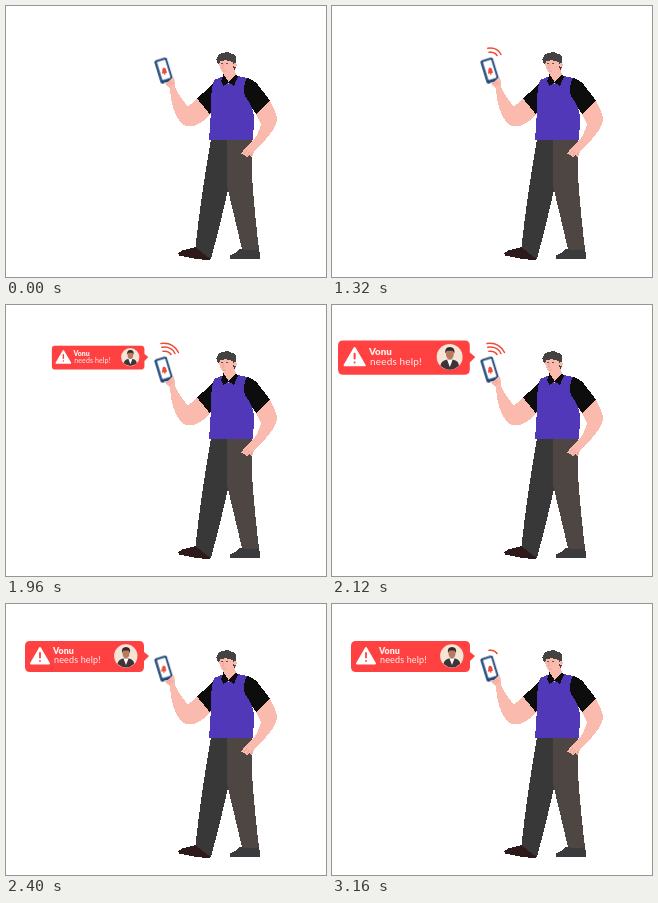
Write an HTML page without scripts that moves like this. It is 320 px wide and 271 px high and loops after 3240 ms.

```html
<!DOCTYPE html>
<html lang="en">
<head>
<meta charset="utf-8">
<title>Help alert</title>
<style>
html, body { margin: 0; width: 100%; height: 100%; overflow: hidden; background: #fff; }
svg { display: block; width: 100%; height: 100%; }
.man { shape-rendering: crispEdges; }
.skin { fill: #fabbae; }
.shirt { fill: #0d0d0d; }
.fold { fill: none; stroke: #e99a8e; stroke-width: .8; stroke-linecap: round; }
.waves { fill: none; stroke: #f04a35; stroke-width: 1.5; stroke-linecap: round; }
.wave, .bubble, .phone, .bell { animation: 3240ms linear infinite; }
.wave { opacity: 0; animation-timing-function: step-end; }
.near { animation-name: near; }
.mid { animation-name: mid; }
.far { animation-name: far; }
.bubble { transform-origin: 140px 52.5px; animation-name: pop; }
.phone { transform-origin: 163px 75px; animation-name: buzz; }
.bell { transform-origin: 158px 61px; animation-name: ring; }
text { font-family: Lato, "Open Sans", sans-serif; fill: #fff0ec; }
.name { font-size: 8.8px; font-weight: 900; }
.note { font-size: 9px; letter-spacing: .15px; }

@keyframes near {
  0%, 72.8% { opacity: 0; }
  37% { opacity: 1; }
  97.5%, 100% { opacity: 1; }
}
@keyframes mid {
  0%, 71.6%, 100% { opacity: 0; }
  39.5% { opacity: 1; }
}
@keyframes far {
  0%, 69.1%, 100% { opacity: 0; }
  43.2% { opacity: 1; }
}
@keyframes pop {
  0%, 52.4% { transform: scale(0); animation-timing-function: ease-in; }
  60.5% { transform: scale(.777); animation-timing-function: ease-out; }
  65.4% { transform: scale(1.107); }
  66.7% { transform: scale(1.115); animation-timing-function: ease-in; }
  69.1% { transform: scale(1.083); animation-timing-function: ease-out; }
  74.1%, 100% { transform: none; }
}
@keyframes buzz {
  0%, 35.8%, 46.9%, 53.1%, 69.2%, 100% { transform: none; }
  38.3%, 43.2%, 55.6%, 63% { transform: rotate(1.2deg); }
  40.7%, 45.7%, 60.5%, 65.4% { transform: none; }
}
@keyframes ring {
  0%, 17.3%, 18.5%, 34.6%, 70.4%, 86.4%, 100% { transform: none; }
  4%, 22%, 74.1% { transform: rotate(7deg); }
  10%, 28%, 80% { transform: rotate(-7deg); }
}
</style>
</head>
<body>
<svg viewBox="0 0 320 271">
  <g class="man">
    <!-- shoes and legs -->
    <path fill="#2e1a1b" d="M172.500 247.500Q175 244 182 243L190 241L205 250L204 254.500Q188 253 173 249.500Z"/>
    <path fill="#3b3b3d" d="M223.500 253V250Q230 247 234 243L252 242Q254.500 246 254.500 253Z"/>
    <path fill="#383838" d="M205 133H222V184Q214 220 205 253Q196 247 189.500 241Q195 190 205 133Z"/>
    <path fill="#4d4642" d="M221 133H246V170Q249 212 253 243Q244 246 236 243L222 184L221 180Z"/>

    <!-- arms -->
    <path class="skin" d="M192 92L182 100.500Q174 92 169 81L168 73Q164 69 160 74L164 83Q165 103 174 116Q179 122 188 120Q197 117 205 107Z"/>
    <path class="skin" d="M263 94Q271 106 271 115Q268 127 248 145L246 152L243 149L241 152L239 149L235 148Q239 141 243 139Q252 131 255 118L249 106Z"/>
    <path class="fold" d="M241 150L243 146M238 148L241 144M245 150L246 147"/>

    <!-- neck, shirt, vest -->
    <path class="skin" d="M218 63H229L230 71L223 79L217 71Z"/>
    <path class="shirt" d="M208 77L191 92.500L204 108.500L210 96ZM237 71Q248 73 252 79L264 94.500L250 108L238 90Z"/>
    <path fill="#5038b9" d="M208 74L217 70.500L222.500 78L231 70L241 72Q235.500 82 239.500 91Q248 101 248 114L247 134H203L205 105Q204 88 208 74Z"/>
    <path class="shirt" d="M217.500 68L215 75L217.500 80L222.500 76.500L228 80L232 70.500L229.500 68.500L222.500 76Z"/>

    <!-- head -->
    <path class="skin" d="M213 54H229Q232 58 229.500 63L227 66Q222 69.500 217 67Q213 64 213 54Z"/>
    <path fill="#454342" d="M211.500 57Q209 53 212 50Q213 47 217 47.500Q221 45 225 47.500Q230 48 230 53Q231 60 228.500 64L227 61L226.500 56Q220 53 214 55.500L213 58Z"/>
    <ellipse class="skin" cx="229" cy="59" rx="1.700" ry="2.500"/>
    <path fill="none" stroke="#5c4340" stroke-width=".9" d="M214.500 57.500H216.500M219.500 57.500H222"/>
    <path class="fold" d="M217.500 58L216.500 62H218M217 65H219.500"/>
  </g>

  <!-- phone -->
  <g class="phone">
    <g transform="rotate(-17 157.500 64.500)">
      <rect x="151.200" y="52.500" width="13" height="24.500" rx="2" fill="#20497d"/>
      <rect x="153.600" y="54.500" width="8.700" height="19" rx=".7" fill="#fff"/>
    </g>
    <g class="bell" fill="#ef4b38">
      <path d="M157.800 61.500Q160.300 62 160.300 64.300L161 66.800L156 67.700L156.300 64.800Q156 62.300 157.800 61.500Z"/>
      <circle cx="158.800" cy="67.800" r=".9"/>
    </g>
    <path class="skin" d="M158 76Q161 77 163 75L167 71Q169 73 169 78L166 82L161 80Z"/>
    <path class="fold" d="M161 78L165 76M163 80L167 77"/>
  </g>

  <g class="waves">
    <path class="wave near" d="M157 46.300Q162.500 45.500 165 49.500"/>
    <path class="wave mid" d="M155.800 42.300Q165 41 169 48.500"/>
    <path class="wave far" d="M155 38.500Q167 37 172.500 47.500"/>
  </g>

  <!-- alert -->
  <g class="bubble">
    <path fill="#ff4141" d="M24 37H133Q138 37 138 42V48L143 52L138 57V63Q138 68 133 68H24Q19 68 19 63V42Q19 37 24 37Z"/>
    <path fill="#fff" stroke="#fff" stroke-width="2" stroke-linejoin="round" d="M34 44L43 59.500H25Z"/>
    <path stroke="#ff4141" stroke-width="1.800" stroke-linecap="round" d="M34 49V53.500M34 57V57.100"/>
    <text class="name" x="47" y="50.300">Vonu</text>
    <text class="note" x="48" y="59.300">needs help!</text>
    <circle cx="119.800" cy="52" r="11.700" fill="#f6e5d6"/>
    <path fill="#40343b" d="M111.500 60Q112 55.500 117 54.500H123Q128 55.500 128.200 60Q120 67 111.500 60Z"/>
    <path fill="#fff" d="M117.500 54.500H122.500L120 61Z"/>
    <ellipse cx="120" cy="49.500" rx="3.500" ry="4.800" fill="#b97a60"/>
    <path fill="#30282a" d="M116 49Q115 43 120 43Q125 43 124 49L122.500 46.500H117.500Z"/>
  </g>
</svg>
</body>
</html>
```
